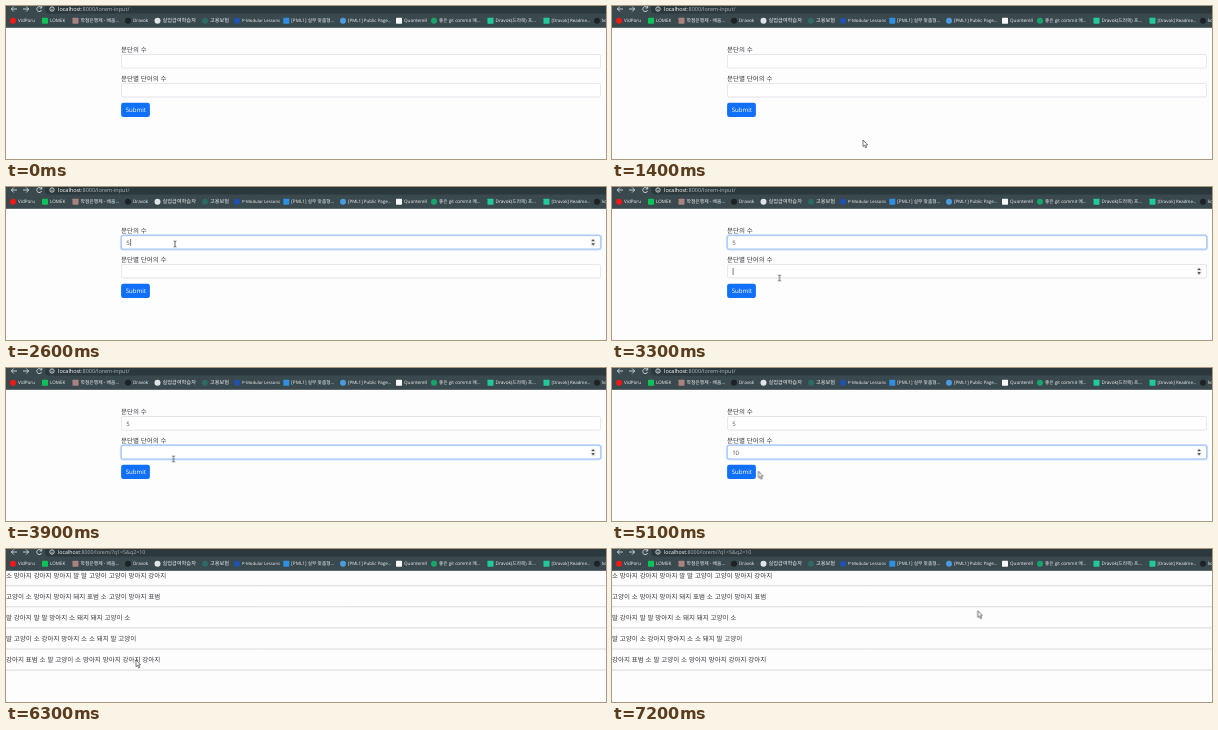
Animation, 600 px wide and 153 px high, one loop 7300 ms. Source, as an HTML page:

```html
<!DOCTYPE html>
<html lang="ko">
<head>
<meta charset="utf-8">
<title>Lorem input</title>
<style>
html, body { margin: 0; width: 100%; height: 100%; overflow: hidden; background: #fefdfe; }
svg { display: block; width: 600px; height: 153px; }
text {
  font-family: "Open Sans", "Noto Sans CJK KR", "Noto Sans CJK", sans-serif;
  text-rendering: geometricPrecision; white-space: pre;
}
.ko { font: 300 6.52px "Noto Sans CJK KR", "Noto Sans CJK", sans-serif; fill: #33373b; }
.val { font-size: 6px; fill: #44494d; }
.url { font-size: 5.5px; fill: #aeb8ba; }
.url tspan { fill: #fff; }
.mark { fill: #eef2f2; }
.field { fill: #fff; stroke: #ced4da; stroke-width: .6; }
.nav { fill: none; stroke: #e3e9ea; stroke-width: .8; }
.rule { stroke: #c9cacc; stroke-width: .7; }

/* All tracks share one 7.3 s clock; 100 ms = 1.36986 % */
.t { animation: 7.3s step-end -5ms infinite; }
.form { animation-name: form; }
.result { animation-name: result; }
.idle { animation-name: idle; }
.busy { animation-name: busy; }
.ring1 { animation-name: ring1; }
.ring2 { animation-name: ring2; }
.spin1 { animation-name: spin1; }
.spin2 { animation-name: spin2; }
.five { animation-name: five; }
.one { animation-name: one; }
.zero { animation-name: zero; }
.caret { animation-name: caret; }
.button { animation-name: button; }
.cursor { animation-name: move; }
.arrow { animation-name: arrow; }
.beam { animation-name: beam; }
.hand { animation-name: hand; }

@keyframes form { 0% { opacity: 1 } 75.342%, 100% { opacity: 0 } }
@keyframes result { 0% { opacity: 0 } 75.342%, 100% { opacity: 1 } }
@keyframes idle { 0% { opacity: 1 } 73.973% { opacity: 0 } 75.342%, 100% { opacity: 1 } }
@keyframes busy { 0% { opacity: 0 } 73.973% { opacity: 1 } 75.342%, 100% { opacity: 0 } }
@keyframes ring1 {
  0% { opacity: 0 }
  26.027% { opacity: 0; animation-timing-function: steps(2) }
  28.767% { opacity: 1 }
  45.205% { opacity: 1; animation-timing-function: steps(2) }
  47.945%, 100% { opacity: 0 }
}
@keyframes ring2 {
  0% { opacity: 0 }
  45.205% { opacity: 0; animation-timing-function: steps(2) }
  47.945%, 100% { opacity: 1 }
}
@keyframes spin1 { 0% { opacity: 0 } 23.288% { opacity: 1 } 45.205%, 100% { opacity: 0 } }
@keyframes spin2 { 0% { opacity: 0 } 43.836%, 100% { opacity: 1 } }
@keyframes five { 0% { opacity: 0 } 34.247%, 100% { opacity: 1 } }
@keyframes one { 0% { opacity: 0 } 56.164%, 100% { opacity: 1 } }
@keyframes zero { 0% { opacity: 0 } 58.904%, 100% { opacity: 1 } }
@keyframes caret {
  0% { opacity: 0; transform: translate(120.6px, 52px) }
  26.027% { opacity: 1; transform: translate(120.6px, 52px) }
  34.247% { opacity: 1; transform: translate(124.1px, 52px) }
  41.096% { opacity: 0; transform: translate(124.1px, 52px) }
  45.205% { opacity: 1; transform: translate(120.6px, 81px) }
  52.055% { opacity: 0; transform: translate(120.6px, 81px) }
  56.164% { opacity: 1; transform: translate(124.1px, 81px) }
  58.904% { opacity: 1; transform: translate(127.5px, 81px) }
  65.753%, 100% { opacity: 0; transform: translate(127.5px, 81px) }
}
@keyframes button { 0% { fill: #1170f8 } 71.233% { fill: #0b5ed7 } 73.973%, 100% { fill: #0a58ca } }
@keyframes move {
  0% { transform: translate(272px, 157px) }
  12.329% { transform: translate(272px, 157px); animation-timing-function: steps(5) }
  19.178% { transform: translate(251px, 134px); animation-timing-function: steps(2) }
  21.918% { transform: translate(173px, 58px); animation-timing-function: steps(4) }
  27.397% { transform: translate(169px, 57px) }
  39.726% { transform: translate(169px, 57px); animation-timing-function: steps(4) }
  45.205% { transform: translate(167.5px, 91px) }
  63.014% { transform: translate(167.5px, 91px); animation-timing-function: steps(5) }
  69.863% { transform: translate(146.5px, 103.3px); animation-timing-function: steps(2) }
  72.603% { transform: translate(132px, 101.7px) }
  75.342% { transform: translate(132px, 101.7px); animation-timing-function: steps(4) }
  80.822% { transform: translate(122px, 118px); animation-timing-function: steps(4) }
  86.301% { transform: translate(130px, 111px); animation-timing-function: steps(7) }
  95.89%, 100% { transform: translate(365.8px, 61.7px) }
}
@keyframes arrow {
  0% { opacity: 1 } 21.918% { opacity: 0 } 65.753% { opacity: 1 }
  71.233% { opacity: 0 } 75.342%, 100% { opacity: 1 }
}
@keyframes beam { 0% { opacity: 0 } 21.918% { opacity: 1 } 65.753%, 100% { opacity: 0 } }
@keyframes hand { 0% { opacity: 0 } 71.233% { opacity: 1 } 75.342%, 100% { opacity: 0 } }
</style>
</head>
<body>
<svg viewBox="0 0 600 153">
  <defs>
    <g id="field"><rect class="field" x="115.3" y=".3" width="479.4" height="13.6" rx="2.2"/></g>
    <g id="ring">
      <rect x="114.6" y="-.4" width="480.8" height="15" rx="2.9" fill="none" stroke="#0d6efd" stroke-opacity=".22" stroke-width="1.4"/>
      <rect x="115.3" y=".3" width="479.4" height="13.6" rx="2.2" fill="none" stroke="#86b7fe" stroke-width=".6"/>
    </g>
    <g id="spin">
      <rect x="584.6" y="3.3" width="5" height="7.6" fill="#f1f1f1"/>
      <path d="M585.3 6.1l1.8-2.1 1.8 2.1zM585.3 8.1l1.8 2.1 1.8-2.1z" fill="#404040"/>
    </g>
  </defs>

  <rect width="600" height="153" fill="#fefdfe"/>

  <g class="t form">
    <text class="ko" x="115" y="46.4">문단의 수</text>
    <use href="#field" y="48.2"/>
    <use class="t ring1" href="#ring" y="48.2"/>
    <use class="t spin1" href="#spin" y="48.2"/>
    <text class="val t five" x="120.2" y="57.6">5</text>
    <text class="ko" x="115" y="75.2">문단별 단어의 수</text>
    <use href="#field" y="77.1"/>
    <use class="t ring2" href="#ring" y="77.1"/>
    <use class="t spin2" href="#spin" y="77.1"/>
    <text class="val t one" x="120.2" y="86.5">1</text>
    <text class="val t zero" x="123.6" y="86.5">0</text>
    <rect class="t caret" width=".6" height="7" fill="#222"/>
    <rect class="t button" x="115.1" y="96.8" width="28.8" height="14.2" rx="2.2"/>
    <text x="119.7" y="106" font-size="6.1" fill="#fff">Submit</text>
  </g>

  <g class="t result" id="result"></g>

  <rect width="600" height="21.8" fill="#3a494e"/>
  <path d="M39 0H600V7.6H43Q39 7.6 39 3.6Z" fill="#2b383c"/>
  <path class="nav" d="M11 3H5.4M7.8.5L5.3 3l2.5 2.5M17 3h5.6M20.2.5L22.7 3l-2.5 2.5"/>
  <path class="nav t idle" d="M35.3 1.6A2.5 2.5 0 1 0 35.6 4M35.7 0V2H33.7"/>
  <path class="nav t busy" d="M31 .8l4.4 4.4M35.4 .8L31 5.2"/>
  <circle class="nav" cx="46" cy="3" r="2.2"/>
  <path class="nav" d="M46 2.7V4.4M46 1.4V2"/>
  <text class="url t form" x="52" y="4.8"><tspan>localhost</tspan>:8000/lorem-input/</text>
  <text class="url t result" x="52" y="4.8" style="font-size:5.25px"><tspan>localhost</tspan>:8000/lorem/?q1=5&amp;q2=10</text>
  <g id="marks"></g>

  <g class="t cursor">
    <path class="t arrow" d="M0 0V6.6L1.5 5.3 2.6 7.8 3.7 7.3 2.6 4.9H4.6Z" fill="#fff" stroke="#222" stroke-width=".6"/>
    <path class="t beam" d="M-1.4-3Q0-3 0-2.3Q0-3 1.4-3M0-2.3V2.3M-1.4 3Q0 3 0 2.3Q0 3 1.4 3" fill="none" stroke="#222" stroke-width=".7"/>
    <path class="t hand" d="M0 .5Q.7-.4 1.3.5V3L4.6 3.7 4.2 7.6H.9L-1.4 4.6Q-1 3.7 0 4.6Z" fill="#fff" stroke="#222" stroke-width=".5"/>
  </g>
</svg>

<script>
// icon x, icon colour, round?, font size, title
const marks = [
  [4, '#f01818', 1, 4.6, 'VidPoru'],
  [36, '#0cc259', 0, 4.6, 'LOMEK'],
  [66.5, '#a9837f', 0, 4.8, '학점은행제 - 배움...'],
  [119, '#1c2225', 1, 4.6, 'Dravok'],
  [148.5, '#dfe5e6', 1, 5.2, '실업급여학습자'],
  [196, '#2c6a66', 1, 5.2, '고용보험'],
  [228, '#1d51b5', 1, 4.3, 'P-Modular Lessons'],
  [277.3, '#2f8fe0', 0, 4.7, '[PML1] 실무 맞춤형...'],
  [334, '#4a9be0', 1, 4.5, '[PML1] Public Page...'],
  [390, '#f6f8f8', 0, 4.6, 'Quonterell'],
  [425, '#17a56d', 1, 4.6, '좋은 git commit 메...'],
  [481.5, '#20c997', 0, 4.7, 'Dravok(드라복) 프...'],
  [537.5, '#20c997', 0, 4.4, '[Dravok] Readme...'],
  [588, '#1c2225', 1, 4.6, 'ko']
];
document.getElementById('marks').innerHTML = marks.map(([x, color, round, size, title]) =>
  `<rect x="${x}" y="11.7" width="6" height="6" rx="${round ? 3 : .6}" fill="${color}"/>` +
  `<text class="mark" x="${x + 8}" y="16.3" font-size="${size}">${title}</text>`).join('');

const lines = [
  '소 망아지 강아지 망아지 말 말 고양이 고양이 망아지 강아지',
  '고양이 소 망아지 망아지 돼지 표범 소 고양이 망아지 표범',
  '말 강아지 말 말 망아지 소 돼지 돼지 고양이 소',
  '말 고양이 소 강아지 망아지 소 소 돼지 말 고양이',
  '강아지 표범 소 말 고양이 소 망아지 망아지 강아지 강아지'
];
document.getElementById('result').innerHTML = lines.map((line, i) => {
  const y = 28.5 + i * 21.1;
  return `<text class="ko" x="0" y="${y}">${line}</text>` +
    `<path class="rule" d="M0 ${y + 8.2}H600"/>`;
}).join('');
</script>
</body>
</html>
```
